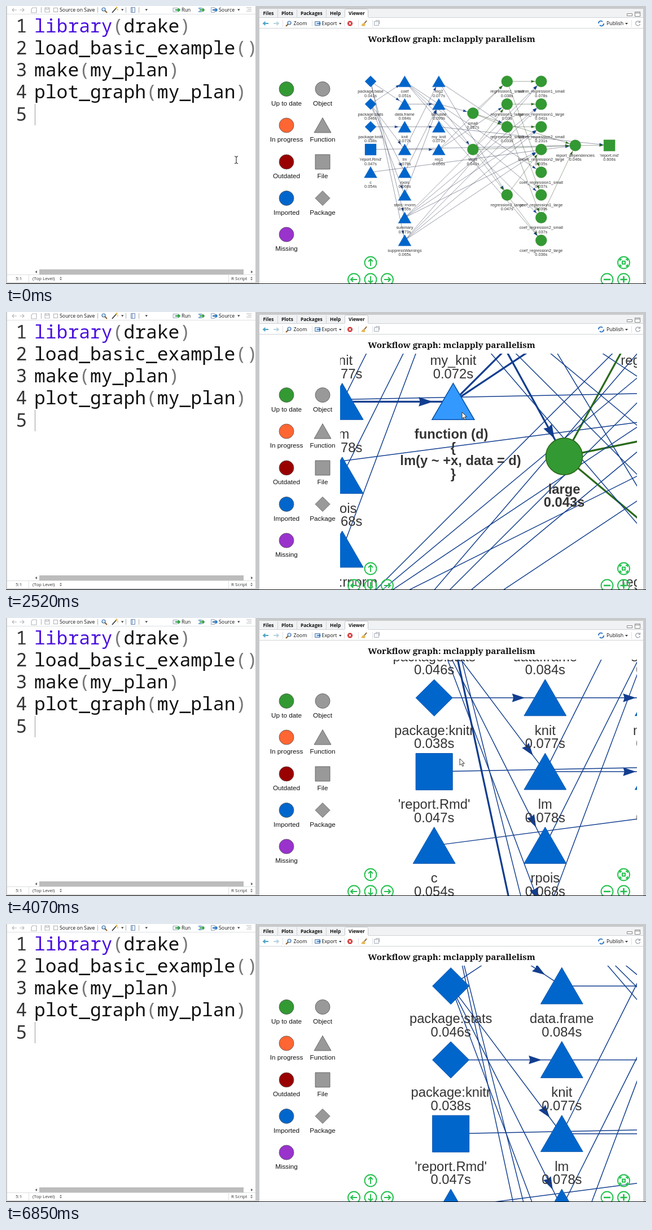
Animation of 1134x494 px, one loop 6880 ms. Source, as an HTML page with a canvas:

```html
<!DOCTYPE html>
<html lang="en">
<head>
<meta charset="utf-8">
<title>Workflow graph</title>
<style>
html, body { margin: 0; width: 100%; height: 100%; overflow: hidden; background: #c8c9ca; }
svg, canvas { position: absolute; left: 0; top: 0; width: 1134px; height: 494px; display: block; }
.code { font: 33px "Noto Sans Mono", monospace; fill: #111; white-space: pre; }
.code .p { fill: #777; }
.ui { font: 500 8.8px "Open Sans", "Noto Sans", sans-serif; fill: #111; }
.tabs { font-weight: 700; font-size: 8.4px; }
.status { font-size: 8px; fill: #333; }
.title { font: 700 15.2px "Noto Serif", serif; fill: #111; text-anchor: middle; }
.legend { font: 11.7px "Liberation Sans", Arial, sans-serif; fill: #111; text-anchor: middle; }
.key { stroke: #555; stroke-width: .8; }
.nav { fill: none; stroke: #1fc04a; stroke-width: 1.9; }
.nav circle { fill: rgba(255, 255, 255, .3); }
</style>
</head>
<body>
<svg viewBox="0 0 1134 494">
  <!-- editor pane -->
  <rect x="2" width="440" height="491" fill="#fff"/>
  <path d="M2 14.5H442M2 477.5H442M40.5 478V491M394.5 478V491" stroke="#dcdfe2"/>
  <g fill="none" stroke="#b4b8bc" stroke-width="1.2">
    <path d="M19 7h-8m3-3-3 3 3 3M24 7h8m-3-3 3 3-3 3"/>
    <path d="M47 3h7v9h-9V6zM69 3h8v8h-8zM71 3v3h4V3M62.5 2v10M162.5 2v10M212.5 2v10M235.5 2v10"/>
    <rect x="84.5" y="3.5" width="7" height="7" fill="#fff"/>
    <path d="M426 3h9M428 6h7M426 9h9"/>
  </g>
  <circle cx="173" cy="6" r="3" fill="#d8ecff" stroke="#3d6fa8" stroke-width="1.2"/>
  <path d="M175 8l4 4" stroke="#8a5a20" stroke-width="2"/>
  <path d="M188 12l7-8" stroke="#333" stroke-width="1.6"/>
  <path d="M196 1v4M194 3h4M198 5v3" stroke="#e0a020"/>
  <path d="M221.5 2.5h7v9h-7zM223.5 2.5v9" fill="#eaf1fa" stroke="#6b8bb5"/>
  <path d="M296 3.5h8v7h-8z" fill="#eef3f8" stroke="#9aabbc"/>
  <path d="M300 7h8m-3-3 3 3-3 3M343 7h8m-3-3 3 3-3 3" fill="none" stroke="#2f9c45" stroke-width="1.8"/>
  <path d="M341 4h6M341 10h6" stroke="#3d7cc0" stroke-width="1.4"/>
  <path d="M363.5 2.5h6v9h-6z" fill="#eef3f8" stroke="#9aabbc"/>
  <path d="M366 7h8m-3-3 3 3-3 3" fill="none" stroke="#2875c8" stroke-width="1.8"/>
  <path d="M204 5.5h4.5l-2.25 3zM246.5 5.5h4.5l-2.25 3zM410 5.5h4.5l-2.25 3z" fill="#333"/>
  <g class="ui"><text x="95" y="10">Source on Save</text><text x="311" y="10">Run</text><text x="377" y="10">Source</text></g>

  <g class="code">
    <g fill="#333"><text x="17.5" y="47">1</text><text x="17.5" y="86">2</text><text x="17.5" y="125">3</text><text x="17.5" y="164">4</text><text x="17.5" y="204">5</text></g>
    <text x="50" y="47"><tspan fill="#4a10e0">library</tspan><tspan class="p">(</tspan>drake<tspan class="p">)</tspan></text>
    <text x="50" y="86">load_basic_example<tspan class="p">()</tspan></text>
    <text x="50" y="125">make<tspan class="p">(</tspan>my_plan<tspan class="p">)</tspan></text>
    <text x="50" y="164">plot_graph<tspan class="p">(</tspan>my_plan<tspan class="p">)</tspan></text>
  </g>
  <path d="M51.5 174V212" stroke="#999"/>
  <rect x="59" y="468" width="362" height="9" fill="#bcbcbc"/>
  <path d="M55 470v5l-3.5-2.5zM434 470v5l3.5-2.5z" fill="#666"/>
  <g class="ui status"><text x="17" y="487">5:1</text><text x="47" y="487">(Top Level)</text><text x="399" y="487">R Script</text></g>
  <path d="M95 483.5l2-2.5 2 2.5zM95 485l2 2.5 2-2.5zM433 483.5l2-2.5 2 2.5zM433 485l2 2.5 2-2.5z" fill="#777"/>

  <!-- viewer pane -->
  <rect x="449" y="5" width="680" height="488" fill="#fff"/>
  <rect x="449" y="5" width="680" height="15" fill="#f0f2f4"/>
  <path d="M600.5 20V8q0-2.5 3-2.5h35q3 0 3 2.5V20" fill="#fff" stroke="#c3c7cb"/>
  <path d="M449 20.5H600M642 20.5H1129M449 39.5H1129M481.5 6V20M515.5 6V20M567.5 6V20" stroke="#cfd3d7"/>
  <path d="M490.5 25v12M542.5 25v12M599.5 25v12M624.5 25v12M649.5 25v12M1108.5 25v12" stroke="#dde0e3"/>
  <g class="ui tabs"><text x="455.5" y="16">Files</text><text x="488" y="16">Plots</text><text x="522" y="16">Packages</text><text x="574" y="16">Help</text><text x="607" y="16">Viewer</text></g>
  <g class="ui"><text x="509.5" y="34">Zoom</text><text x="559.5" y="34">Export</text><text x="1064" y="34">Publish</text></g>
  <path d="M465 31h-9m3.5-3-3.5 3 3.5 3" fill="none" stroke="#4aa3c8" stroke-width="1.8"/>
  <path d="M474 31h9m-3.5-3 3.5 3-3.5 3" fill="none" stroke="#b5d3de" stroke-width="1.8"/>
  <circle cx="502" cy="30" r="3" fill="#d8ecff" stroke="#3d6fa8" stroke-width="1.2"/>
  <path d="M500 32l-4 4" stroke="#8a5a20" stroke-width="2"/>
  <path d="M547.5 27.5h9v7h-9z" fill="#cfe2f5" stroke="#5b7ea8"/>
  <path d="M551 31h6m-2-2 2 2-2 2" fill="none" stroke="#2875c8" stroke-width="1.4"/>
  <path d="M590 30h4.5l-2.25 3zM1097 30h5l-2.5 3z" fill="#333"/>
  <circle cx="609.5" cy="31" r="4.5" fill="#cf2a2a"/>
  <path d="M607.5 29l4 4m0-4-4 4" stroke="#fff" stroke-width="1.2"/>
  <path d="M639 26l-4 5" stroke="#8a5a20" stroke-width="1.8"/>
  <path d="M629 35l4-5 4 3-2 3z" fill="#e5b64c"/>
  <path d="M652.5 27.5h8v7h-8zM655.5 27.5v-2h6v6h-1" fill="#f5f7f9" stroke="#aab1b8"/>
  <path d="M1050 31a4 4 0 0 1 7-3m2 3a4 4 0 0 1-7 3" fill="none" stroke="#3b7fc4" stroke-width="2"/>
  <path d="M1122.5 28a4 4 0 1 0 1 4m0-6v3h-3" fill="none" stroke="#a0a6ac" stroke-width="1.3"/>
  <path d="M1100.5 13.5h9v4h-9zM1114.5 10.5h9v8h-9zM1114 12.5h10" fill="#fff" stroke="#888"/>
  <text class="title" x="789.5" y="64">Workflow graph: mclapply parallelism</text>
  <g class="key">
    <circle cx="497" cy="147.5" r="13" fill="#339933"/><circle cx="497" cy="212" r="13" fill="#ff6633"/>
    <circle cx="497" cy="277" r="13" fill="#990000"/><circle cx="497" cy="341.5" r="13" fill="#0066cc"/>
    <circle cx="497" cy="406" r="13" fill="#9933cc"/>
    <g fill="#999"><circle cx="561" cy="147.5" r="13"/><path d="M561 198.5L576 225H546zM548 264h26v26h-26zM561 328.5l13 13-13 13-13-13z"/></g>
  </g>
  <g class="legend">
    <text x="497" y="176.5">Up to date</text><text x="497" y="241">In progress</text><text x="497" y="306">Outdated</text><text x="497" y="370.5">Imported</text><text x="497" y="435">Missing</text>
    <text x="561" y="176.5">Object</text><text x="561" y="241">Function</text><text x="561" y="306">File</text><text x="561" y="370.5">Package</text>
  </g>
</svg>

<canvas id="graph" width="1134" height="494"></canvas>

<svg viewBox="0 0 1134 494">
  <g class="nav">
    <circle cx="646" cy="456" r="10.5"/><path d="M646 462v-12m-4 4 4-4 4 4"/>
    <circle cx="616.5" cy="486" r="10.5"/><path d="M622 486h-11m4-4-4 4 4 4"/>
    <circle cx="646" cy="486" r="10.5"/><path d="M646 480v12m-4-4 4 4 4-4"/>
    <circle cx="675.5" cy="486" r="10.5"/><path d="M670 486h11m-4-4 4 4-4 4"/>
    <circle cx="1094.5" cy="456" r="10.5"/><path d="M1092 453.5h5v5h-5zM1088 453v-3h3M1098 450h3v3M1088 459v3h3M1098 462h3v-3"/>
    <circle cx="1065" cy="486" r="10.5"/><path d="M1059 486h12" stroke-width="2.6"/>
    <circle cx="1094.5" cy="486" r="10.5"/><path d="M1088.5 486h12M1094.5 480v12" stroke-width="2.6"/>
  </g>
  <path d="M0 493.5H1134" stroke="#111"/>
  <g id="cursor">
    <path id="beam" d="M-3-6q3 0 3 2 0-2 3-2M0-4V5M-3 7q3 0 3-2 0 2 3 2" fill="none" stroke="#111"/>
    <g id="arrow">
      <path d="M0 0V11.5L2.8 9 4.8 13.5 6.8 12.6 4.8 8.2H8.4z" fill="#fff" stroke="#222" stroke-width=".9"/>
      <circle id="busy" cx="9" cy="0" r="5" fill="#e8f7fc" stroke="#4fb4d6" stroke-width="3"/>
    </g>
  </g>
</svg>

<script>
const LOOP = 6880, ZOOM_X = 755.6, ZOOM_Y = 297.5, ZOOM_STEP = 1.1252;
const ctx = document.getElementById('graph').getContext('2d');
const el = id => document.getElementById(id);
const FILL = { blue: '#0066cc', green: '#339933' };
const LINE = { blue: '#123e8f', green: '#2b6a1c' };
const HAIRLINE = { blue: '#1d2645', green: '#2c4320' };

// name, seconds, shape, column, row
const nodes = {};
`package:base .041 diamond 0 0
package:stats .046 diamond 0 1
package:knitr .038 diamond 0 2
'report.Rmd' .047 square 0 3
c .054 triangle 0 4
coef .051 triangle 1 0
data.frame .084 triangle 1 1
knit .077 triangle 1 2
lm .078 triangle 1 3
rpois .068 triangle 1 4
stats::rnorm .055 triangle 1 5
summary .073 triangle 1 6
suppressWarnings .065 triangle 1 7
reg2 .077 triangle 2 0
simulate .099 triangle 2 1
my_knit .072 triangle 2 2
reg1 .056 triangle 2 3
small .027 circle 3 1.4
large .043 circle 3 3
regression1_small .038 circle 4 0
regression1_large .03 circle 4 1
regression2_small .033 circle 4 2
regression2_large .047 circle 4 5
summ_regression1_small .078 circle 5 0
summ_regression1_large .041 circle 5 1
summ_regression2_small .231 circle 5 2
summ_regression2_large .035 circle 5 3
coef_regression1_small .037 circle 5 4
coef_regression1_large .039 circle 5 5
coef_regression2_small .037 circle 5 6
coef_regression2_large .036 circle 5 7
report_dependencies .046 circle 6 2.82
'report.md' .606 square 7 2.82`.split('\n').forEach(row => {
  const [name, sec, shape, col, line] = row.split(' ');
  nodes[name] = {
    name, shape, time: '0' + sec + 's', x: 646 + 60.45 * col, y: 134 + 40.35 * line,
    hue: col > 2 ? 'green' : 'blue'
  };
});

const edges = [];
const link = (from, ...to) => to.forEach(n => edges.push([nodes[from], nodes[n]]));
link('package:base', 'data.frame', 'summary', 'suppressWarnings');
link('package:stats', 'coef', 'lm', 'rpois', 'stats::rnorm');
link('package:knitr', 'knit');
link('knit', 'my_knit');
link('lm', 'reg1', 'reg2');
for (const f of ['data.frame', 'rpois', 'stats::rnorm']) link(f, 'simulate');
link('simulate', 'small', 'large');
for (const n of ["'report.Rmd'", 'c', 'small', 'large', 'coef_regression2_small']) link(n, 'report_dependencies');
link('my_knit', "'report.md'");
link('report_dependencies', "'report.md'");
for (const i of [1, 2]) for (const size of ['small', 'large']) {
  const model = 'regression' + i + '_' + size;
  link('reg' + i, model);
  link(size, model);
  link(model, 'summ_' + model, 'coef_' + model);
  link('summary', 'summ_' + model);
  link('suppressWarnings', 'summ_' + model);
  link('coef', 'coef_' + model);
}

// keys: [ms, x, y]
const mouse = [[120, 408, 273], [680, 757.5, 300], [1420, 757.5, 300], [1680, 989, 165], [1750, 989, 165],
  [2080, 989, 262], [2160, 989, 262], [2420, 808, 178], [2580, 808, 178], [2720, 724.8, 211.7], [2780, 724.8, 211.7],
  [3180, 967, 370], [3400, 967, 370], [3660, 686.6, 294.6], [3720, 686.6, 294.6], [3990, 804, 250], [4350, 804, 250],
  [4800, 768, 136], [5450, 768, 136], [5680, 660, 250], [5740, 660, 250], [6200, 689.5, 349.6], [6350, 689.5, 349.6], [6650, 640, 510]];
const pan = [[2780, 0, 0], [3180, 242.2, 158.3], [3720, 242.2, 158.3], [3990, 359.6, 113.7], [5740, 359.6, 113.7], [6200, 389.1, 213.3]];
const drag = [[1750, 0, 0], [2080, 0, 29.9]];

function track(keys, t) {
  let i = keys.findIndex(k => k[0] > t);
  if (i < 0) i = keys.length;
  const a = keys[Math.max(i - 1, 0)], b = keys[Math.min(i, keys.length - 1)];
  const u = a === b ? 0 : (t - a[0]) / (b[0] - a[0]), e = u * u * (3 - 2 * u);
  return [a[1] + (b[1] - a[1]) * e, a[2] + (b[2] - a[2]) * e];
}
const during = (t, a, b) => t >= a && t < b;

function drawEdge([a, b], wide, colors) {
  const angle = Math.atan2(b.y - a.y, b.x - a.x), len = wide ? 7.8 : 7;
  ctx.strokeStyle = colors[a.hue];
  ctx.fillStyle = LINE[a.hue];
  ctx.lineWidth = wide ? 1 : .45;
  ctx.beginPath();
  ctx.moveTo(a.x, a.y);
  ctx.lineTo(b.x, b.y);
  ctx.stroke();
  ctx.save();
  ctx.translate(b.x, b.y);
  ctx.rotate(angle);
  ctx.beginPath();
  ctx.moveTo(-11, 0);
  ctx.lineTo(-11 - len, len / 3);
  ctx.lineTo(-11 - len * .9, 0);
  ctx.lineTo(-11 - len, -len / 3);
  ctx.fill();
  ctx.restore();
}

function drawNode(n, lit, bold, label) {
  const { x, y } = n, r = 10;
  ctx.beginPath();
  if (n.shape === 'circle') ctx.arc(x, y, r, 0, 7);
  else if (n.shape === 'square') ctx.rect(x - r, y - r, 2 * r, 2 * r);
  else {
    const pts = n.shape === 'diamond' ? [[0, -r], [r, 0], [0, r], [-r, 0]] : [[0, -10.1], [11.5, 9.8], [-11.5, 9.8]];
    pts.forEach(p => ctx.lineTo(x + p[0], y + p[1]));
    ctx.closePath();
  }
  ctx.fillStyle = lit ? '#3399ff' : FILL[n.hue];
  ctx.fill();
  ctx.strokeStyle = n.hue === 'green' ? '#2b6a1c' : '#0d55ab';
  ctx.lineWidth = bold ? .5 : .3;
  ctx.stroke();
  ctx.fillStyle = '#343434';
  ctx.font = (bold ? 'bold ' : '') + '7.3px "Liberation Sans", Arial, sans-serif';
  label.forEach((s, i) => ctx.fillText(s, x, y + 20.3 + 7.2 * i));
}

function drawGraph(t) {
  const steps = Math.max(0, Math.min(10, Math.floor((t - 760) / 60)));
  const s = ZOOM_STEP ** steps, [px, py] = track(pan, t);
  const { large, reg1 } = nodes, knitr = nodes['package:knitr'];
  large.y = 134 + 40.35 * 3 + track(drag, t)[1];
  const picked = during(t, 1720, 3720) ? large : null;
  const hover = during(t, 2360, 2650) ? reg1 : during(t, 4740, 5510) ? knitr : null;
  const hoverLabel = hover === reg1 ? ['function (d) ', '{', '    lm(y ~ +x, data = d)', '}'] : ['version 1.17'];
  const edgePicked = during(t, 3720, 4450);

  ctx.setTransform(1, 0, 0, 1, 0, 0);
  ctx.clearRect(0, 0, 1134, 494);
  ctx.save();
  ctx.beginPath();
  ctx.rect(592, 74, 526, 419);
  ctx.clip();
  ctx.translate(ZOOM_X + px, ZOOM_Y + py);
  ctx.scale(s, s);
  ctx.translate(-ZOOM_X, -ZOOM_Y);
  ctx.textAlign = 'center';
  for (const e of edges) {
    const wide = e.some(n => n === picked || n === hover) ||
      edgePicked && e[0].name === 'package:base' && e[1].name === 'suppressWarnings';
    drawEdge(e, wide, s < 2 ? HAIRLINE : LINE);
  }
  for (const n of Object.values(nodes)) {
    const lit = n === hover;
    drawNode(n, lit, lit || n === picked, lit ? hoverLabel : [n.name, n.time]);
  }
  ctx.restore();
}

function drawCursor(t) {
  const [x, y] = track(mouse, t), inEditor = x < 442;
  el('cursor').setAttribute('transform', `translate(${x} ${y})`);
  el('beam').style.display = inEditor ? '' : 'none';
  el('arrow').style.display = inEditor ? 'none' : '';
  el('busy').style.display = during(t, 680, 1420) ? '' : 'none';
}

function frame(now) {
  const t = now % LOOP;
  drawGraph(t);
  drawCursor(t);
  requestAnimationFrame(frame);
}
frame(0);
</script>
</body>
</html>
```
